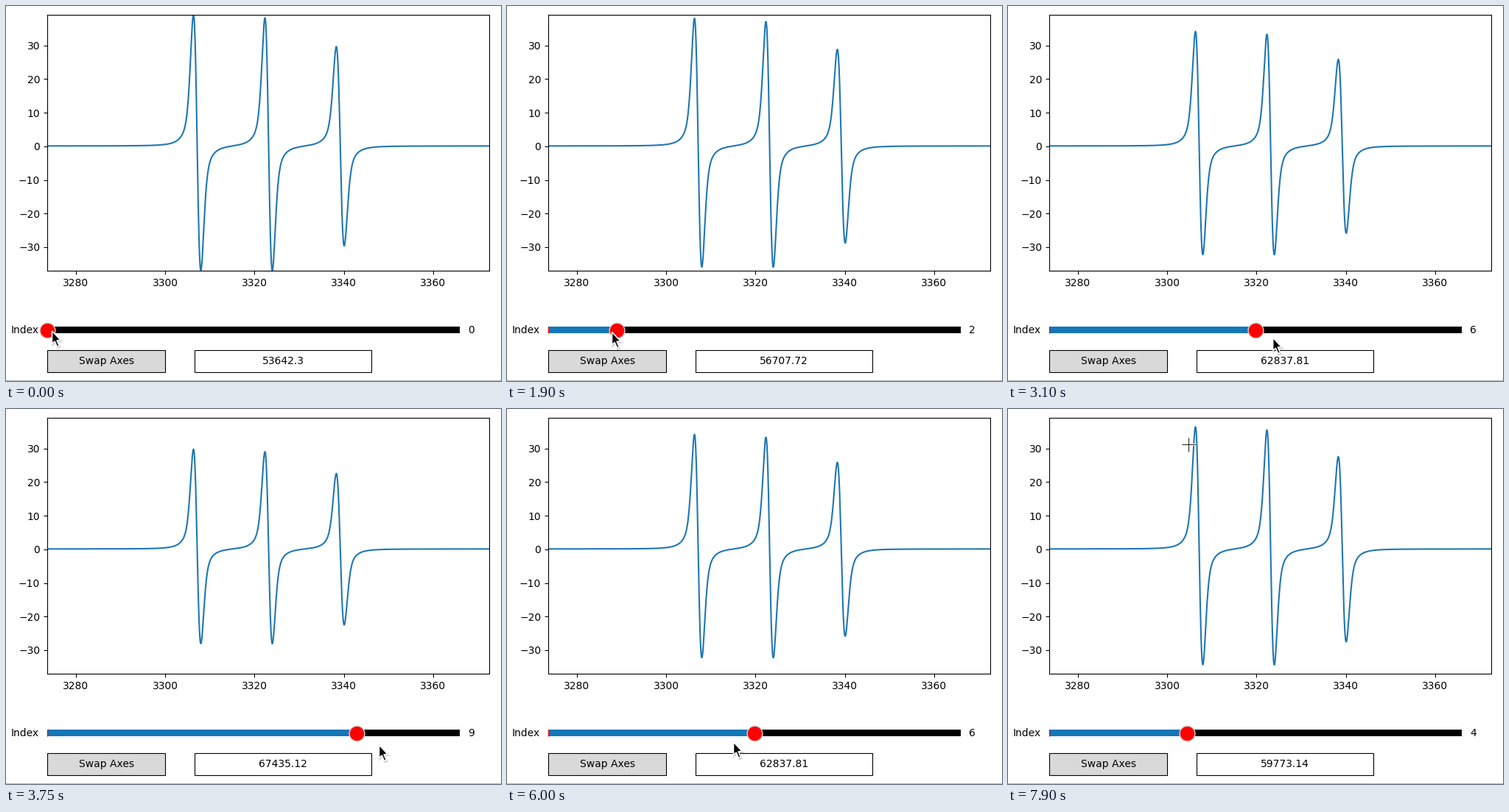
A matplotlib script for the animation above (8 s loop, 672 by 510 pixels).

```python
import numpy as np
import matplotlib.pyplot as plt
from matplotlib.animation import FuncAnimation
from matplotlib.patches import Polygon, Rectangle

plt.rcParams["font.family"] = "DejaVu Sans"
W, H, DPI = 672, 510, 100
STEP_MS, LOOP_MS = 50, 8000
TRACK_X, TRACK_Y, TRACK_W, MAX_INDEX = 56, 441, 560, 12
SLOT = TRACK_W / MAX_INDEX

# the tiny excess keeps the pixel size from being truncated to 509
fig = plt.figure(figsize=(W / DPI + 1e-6, H / DPI + 1e-6), dpi=DPI, facecolor="white")

# --- spectrum -------------------------------------------------------------
# centre, half distance between extremes, upper height, lower depth
LINES = [(3307.16, 0.825, 39.0, 37.1),
         (3323.16, 0.825, 38.1, 37.1),
         (3339.20, 0.880, 29.6, 29.7)]


def dispersion(d, w):
    """Even mix of Gaussian and Lorentzian derivatives with unit extremes."""
    v, u = d / w, d / (w * np.sqrt(3))
    gauss = v * np.exp((1 - v**2) / 2)
    lorentz = 16 / (3 * np.sqrt(3)) * u / (1 + u**2)**2
    return -(gauss + lorentz) / 2


field = np.linspace(3273.6, 3372.55, 1600)
spectrum = sum(np.where(field < c, up, down) * dispersion(field - c, w)
               for c, w, up, down in LINES)


def strength(index):
    return 1 - 0.0105 * index - 0.0018 * index**2


def reading(index):
    value = np.interp(index, [0, 4, 5, 9, 11, 12],
                      [53642.3, 59773.14, 61305.37, 67435.12, 70499.68, 72031.95])
    return str(round(float(value), 2))


ax = fig.add_axes([56 / W, 150 / H, 600 / W, 348 / H])
ax.set(xlim=(field[0], field[-1]), ylim=(-37.0, 39.1),
       xticks=range(3280, 3361, 20), yticks=range(-30, 31, 10))
curve, = ax.plot(field, spectrum, color="tab:blue", lw=1.5)

# --- widgets, in pixel coordinates ----------------------------------------
ui = fig.add_axes([0, 0, 1, 1], zorder=5)
ui.set(xlim=(0, W), ylim=(H, 0))
ui.axis("off")


def box(x, y, w, h, color, edge="none", lw=0.8, z=1):
    return ui.add_patch(Rectangle((x, y), w, h, fc=color, ec=edge, lw=lw, zorder=z))


def label(x, y, text, ha="center"):
    return ui.text(x, y, text, ha=ha, va="center", fontsize=10)


box(0, 509, W, 1, "#b8b8b8")
box(56, 468, 160, 30, "0.85", "black")
box(256, 468, 240, 30, "white", "black")
label(136, 483, "Swap Axes")
value_text = label(376, 483, "")

label(TRACK_X - 0.02 * TRACK_W, TRACK_Y, "Index", "right")
index_text = label(TRACK_X + 1.02 * TRACK_W, TRACK_Y, "", "left")
box(TRACK_X, TRACK_Y - 4.5, TRACK_W, 9, "black")
fill = box(TRACK_X, TRACK_Y - 4.5, 0, 9, "#1377b8", z=2)
ui.plot([TRACK_X] * 2, [TRACK_Y - 4.5, TRACK_Y + 4.5], color="red", lw=1,
        solid_capstyle="butt", zorder=3)
handle, = ui.plot([], [], "o", ms=15, mfc="red", mec="lightgray", mew=1, zorder=4)

# --- pointer --------------------------------------------------------------
ARROW = np.array([(1.5, 2), (1.5, 19.5), (5.2, 16), (8.5, 23.5),
                  (11.3, 22.3), (8, 14.8), (13.2, 14.5)])
shadow = ui.add_patch(Polygon(ARROW, fc="black", ec="black", lw=2, alpha=0.13, zorder=6))
arrow = ui.add_patch(Polygon(ARROW, fc="black", ec="white", lw=1.1, zorder=7))
cross = [ui.plot([], [], color=color, lw=lw, solid_capstyle="butt", zorder=z)[0]
         for color, lw, z in (("white", 2.2, 6), ("#2a2a2a", 0.8, 7))]

# time, x, y of the pointer tip
PATH = np.array([
    (0, 61, 440), (900, 61, 440), (1050, 76, 440), (1150, 76, 440),
    (1450, 92, 441), (1550, 92, 441), (2400, 211, 442), (2500, 223, 442),
    (3250, 392, 451), (3750, 505, 455), (4100, 566, 458), (4500, 602, 460),
    (4700, 602, 460), (4850, 573, 459), (5550, 400, 454), (6000, 306, 451),
    (6400, 222, 451), (6550, 222, 451), (7200, 266, -30), (7750, 190, -30),
    (7800, 203, 14), (7850, 228, 36), (7900, 245, 48), (LOOP_MS, 245, 48)])


def pointer(t):
    return tuple(np.interp(t, PATH[:, 0], PATH[:, k]) for k in (1, 2))


def slider_index(t):
    # the plot trails the pointer by one step and stays put after release
    x, _ = pointer(np.clip(t - STEP_MS, 0, 6500))
    return int(np.clip(round((x - TRACK_X) / SLOT), 0, MAX_INDEX))


def update(frame):
    t = frame * STEP_MS
    index = slider_index(t)
    curve.set_ydata(0.1 + strength(index) * spectrum)
    fill.set_width(index * SLOT)
    handle.set_data([TRACK_X + index * SLOT], [TRACK_Y])
    index_text.set_text(str(index))
    value_text.set_text(reading(index))

    x, y = pointer(t)
    over_plot = 12 <= y <= 360
    arrow.set_xy(ARROW + (x, y))
    shadow.set_xy(ARROW + (x + 0.8, y + 1.5))
    for part in (arrow, shadow):
        part.set_visible(not over_plot)
    x, y = round(x), round(y)
    for part in cross:
        part.set_data([x - 9, x + 10, np.nan, x, x], [y, y, np.nan, y - 9, y + 10])
        part.set_visible(over_plot)
    return [curve, fill, handle, index_text, value_text, arrow, shadow, *cross]


anim = FuncAnimation(fig, update, frames=LOOP_MS // STEP_MS, interval=STEP_MS,
                     repeat=True, repeat_delay=0, blit=False)
plt.show()
```
